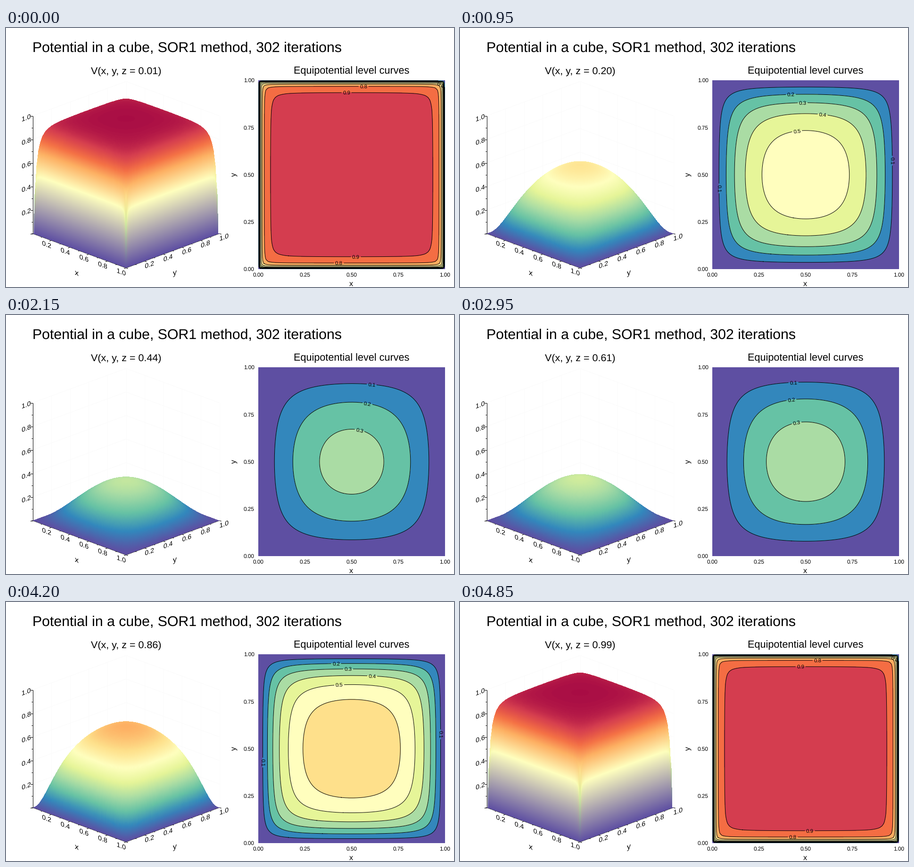
Recreate the animation shown at these times as a matplotlib script. Size 950 px wide and 550 px high, loop 4900 ms.

```python
import numpy as np
import matplotlib.pyplot as plt
from matplotlib.animation import FuncAnimation
from matplotlib.patches import PathPatch
from matplotlib.textpath import TextPath
from matplotlib.transforms import Affine2D

W, H, DPI = 950, 550, 100
PX = 72 / DPI
FRAMES, INTERVAL = 98, 50

plt.rcParams["font.family"] = "Liberation Sans"
plt.rcParams["text.hinting"] = "none"
fig = plt.figure(figsize=(W / DPI, H / DPI), dpi=DPI, facecolor="white")
ax = fig.add_axes([0, 0, 1, 1])
ax.set(xlim=(0, W), ylim=(H, 0))
ax.set_autoscale_on(False)
ax.axis("off")
cmap = plt.get_cmap("Spectral_r")

# Potential in the unit cube: 1 on z = 0 and z = 1, 0 on the side walls.
N = 99
grid = np.arange(N + 1) / N
modes = np.arange(1, N)
sines = np.sin(np.pi * np.outer(grid, modes))
coef = 2 / N * sines.sum(axis=0)
lam = 4 * np.sin(np.pi * modes / (2 * N)) ** 2
growth = np.arccosh(1 + (lam[:, None] + lam) / 2)
norm = np.outer(coef, coef) / np.cosh(growth * N / 2)


def potential(layer):
    v = sines @ (norm * np.cosh(growth * (layer - N / 2))) @ sines.T
    return np.clip(v, 0, 1)


# ---- Left: surface seen from the corner x = 1, y = 0 ----
MID, BASE, DX, DY, DZ = 254.5, 436.5, 198, 73, 250
SLOPE = DY / DX


def project(x, y, z):
    return MID + DX * (x + y - 1), BASE + DY * (x - y) - DZ * z


cols = np.arange(56, 453)
rows = np.arange(113, 512)

# Each screen column cuts the grid along x + y = u; sample at the crossings.
u = ((cols + 0.5 - MID) / DX + 1)[:, None]
cut = np.concatenate([np.tile(grid, (len(cols), 1)), u - grid], axis=1)
cut = np.clip(cut, np.maximum(0, u - 1), np.minimum(1, u))
cut_x = -np.sort(-cut, axis=1)
cut_y = np.clip(u - cut_x, 0, 1)
cut_base = BASE + DY * (cut_x - cut_y)
ix = np.minimum((cut_x * N).astype(int), N - 1)
iy = np.minimum((cut_y * N).astype(int), N - 1)
fx, fy = cut_x * N - ix, cut_y * N - iy
corners = [(ix, iy, (1 - fx) * (1 - fy)), (ix + 1, iy, fx * (1 - fy)),
           (ix, iy + 1, (1 - fx) * fy), (ix + 1, iy + 1, fx * fy)]


def surface_image(v):
    field = np.dstack([v, cmap(v)[..., :3]])
    s = sum(w[..., None] * field[i, j] for i, j, w in corners)
    # Running minimum from front to back leaves only the visible part.
    edge = np.minimum.accumulate(cut_base - DZ * s[..., 0], axis=1)
    img = np.zeros((len(rows), len(cols), 4))
    y = rows + 0.5
    for c in range(len(cols)):
        back_first = edge[c, ::-1]
        for ch in range(3):
            img[:, c, ch] = np.interp(y, back_first, s[c, ::-1, ch + 1])
        img[:, c, 3] = (y >= edge[c, -1]) & (y <= edge[c, 0])
    return img


def line(p, q, color="black", width=1.0, z=2):
    ax.plot([p[0], q[0]], [p[1], q[1]], color=color, lw=width * PX, zorder=z,
            solid_capstyle="butt")


def slanted(s, x, y, slope, size=14):
    path = TextPath((0, 0), s, size=size)
    box = path.get_extents()
    place = (Affine2D().translate(-(box.x0 + box.x1) / 2, -(box.y0 + box.y1) / 2)
             + Affine2D([[1, 0, x], [slope, -1, y], [0, 0, 1]]))
    ax.add_patch(PathPatch(place.transform_path(path), fc="black", lw=0, zorder=5))


def tick(p, dx, dy, major):
    size = 4.5 if major else 2.5
    line(p, (p[0] + dx * size, p[1] + dy * size))


FAINT = "#fbfbfb"
for t in np.arange(0, 1.01, 0.2):
    line(project(t, 1, 0), project(t, 1, 1), FAINT, z=1)
    line(project(0, t, 0), project(0, t, 1), FAINT, z=1)
    line(project(0, 0, t), project(0, 1, t), FAINT, z=1)
    line(project(0, 1, t), project(1, 1, t), FAINT, z=1)

line(project(0, 0, 0), project(0, 0, 1))
line(project(0, 0, 0), project(1, 0, 0))
line(project(1, 0, 0), project(1, 1, 0))
for n in range(11):
    t, major = n / 10, n % 2 == 0
    tick(project(0, 0, t), -1, 0, major)
    tick(project(t, 0, 0), -0.94, 0.35, major)
    tick(project(1, t, 0), 0.94, 0.35, major)
    if major and n:
        name = f"{t:.1f}"
        x, y = project(0, 0, t)
        slanted(name, x - 13.5, y + 4, -SLOPE)
        x, y = project(t, 0, 0)
        slanted(name, x - 10, y + 8.5, SLOPE)
        x, y = project(1, t, 0)
        slanted(name, x + 10, y + 7.5, -SLOPE)
slanted("x", 150, 521, SLOPE, 16)
slanted("y", 358, 522, -SLOPE, 16)

surface = ax.imshow(np.zeros((len(rows), len(cols), 4)), aspect="auto",
                    interpolation="nearest", zorder=3,
                    extent=(cols[0], cols[-1] + 1, rows[-1] + 1, rows[0]))

# ---- Right: level curves ----
LEFT, TOP, WIDE, TALL = 535, 111, 396, 401
CX, CY = LEFT + WIDE / 2, TOP + TALL / 2
map_x, map_y = LEFT + WIDE * grid, TOP + TALL * (1 - grid)
levels = np.arange(1, 10) / 10
bands = np.r_[-0.01, levels, 1.01]
band_colors = cmap(np.arange(10) / 10)

# Distance of the slice from the middle -> (level in tenths, direction in degrees).
LABELS = {
    0.49: [(8, 82.4), (9, 93.6), (1, 45.7), (9, -87), (8, -98.2)],
    0.429: [(1, 45.5), (2, 52.7), (3, 82.3), (4, 93.5), (6, 86.8), (8, 98.6),
            (7, -5.6), (5, -8.3), (2, 218), (4, -87.4), (3, -98.3)],
    0.298: [(2, 100.3), (3, 92.6), (4, 74.2), (5, 101), (1, 189), (1, 9.3)],
    0.268: [(2, 101.7), (4, 103.5), (5, 69.7), (1, 189.2), (1, 9.4), (3, -11.9)],
    0.106: [(1, 98.8), (2, 102.9), (3, 103)],
    0.056: [(1, 75.6), (2, 75), (3, 75.7)],
}
GAP, INSET = 10, 9


def text(x, y, s, size, **kw):
    kw = {"va": "center_baseline", "ha": "center", "zorder": 6, **kw}
    return ax.text(x, y, s, fontsize=size * PX, color="black", **kw)


def resample(pts):
    dist = np.r_[0, np.cumsum(np.hypot(*np.diff(pts, axis=0).T))]
    at = np.linspace(0, dist[-1], int(dist[-1]) + 2)
    return np.column_stack([np.interp(at, dist, pts[:, k]) for k in (0, 1)])


def label_spot(pts, angle):
    a = np.degrees(np.arctan2(CY - pts[:, 1], pts[:, 0] - CX))
    i = np.argmin(np.abs((a - angle + 180) % 360 - 180))
    n = len(pts)
    dx, dy = pts[(i + 5) % n] - pts[(i - 5) % n]
    turn = np.degrees(np.arctan2(-dy, dx))
    # Keep the label inside the plot.
    spot = np.clip(pts[i], (LEFT + INSET, TOP + INSET),
                   (LEFT + WIDE - INSET, TOP + TALL - INSET))
    return spot, (turn + 90) % 180 - 90


for t in np.arange(0, 1.01, 0.25):
    text(LEFT + WIDE * t, 523.5, f"{t:.2f}", 11.7)
    text(526.5, TOP + TALL * (1 - t), f"{t:.2f}", 11.7, ha="right")
text(732, 548.5, "x", 16, va="baseline")
text(483, 311, "y", 16, va="center", rotation=90)

text(55.5, 51, "Potential in a cube, SOR1 method, 302 iterations", 30.2,
     ha="left", va="baseline")
text(733, 97.5, "Equipotential level curves", 21.6, va="baseline")
caption = text(254.5, 97.5, "", 21.5, va="baseline")
curves, = ax.plot([], [], color="black", lw=PX, zorder=5)
live = []


def draw_levels(v, depth):
    live.append(ax.contourf(map_x, map_y, v, levels=bands, colors=band_colors,
                            zorder=4))
    found = ax.contour(map_x, map_y, v, levels=levels)
    segments = found.allsegs
    found.remove()
    labels = LABELS[min(LABELS, key=lambda d: abs(d - depth))]
    parts = []
    for tenth, segs in enumerate(segments, 1):
        for seg in segs:
            if len(seg) < 3:
                continue
            pts = resample(np.asarray(seg))
            shown = pts.copy()
            for level, angle in labels:
                if level != tenth or len(pts) < 60:
                    continue
                spot, turn = label_spot(pts, angle)
                shown[np.hypot(*(pts - spot).T) < GAP] = np.nan
                live.append(text(*spot, f"{tenth / 10:.1f}", 11.5, rotation=turn,
                                 rotation_mode="anchor"))
            parts += [shown, [[np.nan, np.nan]]]
    curves.set_data(*np.concatenate(parts).T)


def draw(k):
    while live:
        live.pop().remove()
    z = (k + 1) / N
    v = potential(k + 1)
    caption.set_text(f"V(x, y, z = {z:.2f})")
    surface.set_data(surface_image(v))
    draw_levels(v, abs(z - 0.5))
    return []


anim = FuncAnimation(fig, draw, frames=FRAMES, interval=INTERVAL, repeat=True,
                     repeat_delay=0, blit=False)
plt.show()
```
